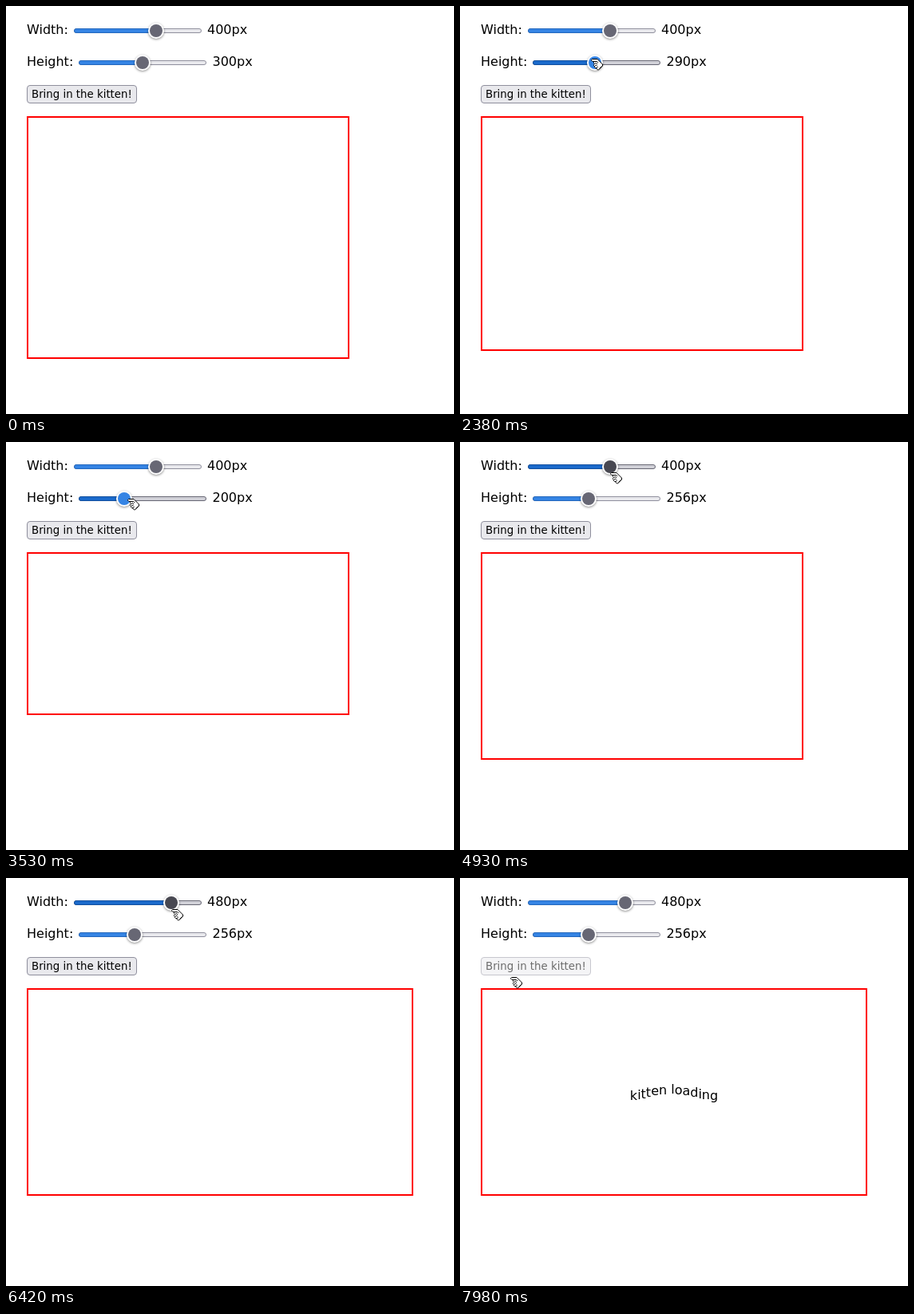
Write an HTML page with a canvas that moves like this. It is 561 px wide and 511 px high and loops after 8000 ms.

```html
<!DOCTYPE html>
<html lang="en">
<head>
<meta charset="utf-8">
<title>Kitten sizer</title>
<style>
html, body { margin: 0; width: 100%; height: 100%; overflow: hidden; background: #fff; }
canvas { display: block; width: 561px; height: 511px; }
</style>
</head>
<body>
<canvas id="stage"></canvas>
<script>
const W = 561, H = 511, LOOP = 8000;
const FONT = '"DejaVu Sans", sans-serif';
const ACCENT = '#3584e4', ACCENT_DARK = '#1b6acb', ACCENT_DARKER = '#12509f';
const PX_PER_UNIT = 140 / 600;
const LAG = 30;

const canvas = document.getElementById('stage');
const ctx = canvas.getContext('2d');
const ratio = window.devicePixelRatio || 1;
canvas.width = Math.round(W * ratio);
canvas.height = Math.round(H * ratio);

// Pointer path: time, x, y
const path = [
  [960, 0, 209], [1360, 142, 94], [1490, 292, 24], [1670, 170, 71],
  [2330, 170, 71], [2560, 125, 31], [2780, 143, 71], [3380, 143, 71],
  [3500, 148, 71], [3530, 152, 71], [3800, 161, 71], [4310, 161, 71],
  [4930, 188, 38], [5730, 188, 38], [6090, 207, 39], [6710, 207, 39],
  [6910, 63, 117], [7560, 63, 117], [7720, 50, 26], [7960, 63, 124]
];

const widthSlider = { x: 85, y: 31, zero: 95, start: 400, down: 5380, up: 6420 };
const heightSlider = { x: 91, y: 71, zero: 101.3, start: 300, down: 2020, up: 3980 };
const button = { x: 26, y: 99, w: 138, h: 23, down: 7380, up: 7440 };

// Slope at a key; flat at holds and turning points
function slope(i, axis) {
  const a = path[i - 1], b = path[i], c = path[i + 1];
  if (!a || !c) return 0;
  if ((b[axis] - a[axis]) * (c[axis] - b[axis]) <= 0) return 0;
  return (c[axis] - a[axis]) / (c[0] - a[0]);
}

function along(t, axis) {
  const last = path.length - 1;
  if (t <= path[0][0]) return path[0][axis];
  if (t >= path[last][0]) return path[last][axis];
  const i = path.findIndex(k => k[0] > t) - 1;
  const a = path[i], b = path[i + 1], d = b[0] - a[0];
  const u = (t - a[0]) / d, u2 = u * u, u3 = u2 * u;
  return Math.round(
    (2 * u3 - 3 * u2 + 1) * a[axis] + (3 * u2 - 2 * u3) * b[axis] +
    d * ((u3 - 2 * u2 + u) * slope(i, axis) + (u3 - u2) * slope(i + 1, axis)));
}

const pressed = (c, t) => t >= c.down && t < c.up;

function valueOf(s, t) {
  if (t < s.down) return s.start;
  const moment = Math.max(s.down, Math.min(t - LAG, s.up));
  return Math.round((along(moment, 1) - s.zero) / PX_PER_UNIT);
}

function overSlider(s, p) {
  return p && p.x >= s.x && p.x <= s.x + 160 && Math.abs(p.y - s.y) <= 9;
}

function overButton(p) {
  return p && p.x >= 26 && p.x < 164 && p.y >= 99 && p.y <= 126;
}

function text(str, x, y, size = 16, color = '#000') {
  ctx.font = `${size}px ${FONT}`;
  ctx.fillStyle = color;
  ctx.fillText(str, x, y);
}

function box(x, y, w, h, r, fill, line) {
  ctx.beginPath();
  ctx.roundRect(x + 0.5, y + 0.5, w - 1, h - 1, r);
  ctx.fillStyle = fill;
  ctx.fill();
  ctx.strokeStyle = line;
  ctx.lineWidth = 1;
  ctx.stroke();
}

function disc(x, y, r, color) {
  ctx.beginPath();
  ctx.arc(x, y, r, 0, Math.PI * 2);
  ctx.fillStyle = color;
  ctx.fill();
}

function drawSlider(s, value, hover, active) {
  const lit = hover || active;
  const thumb = Math.round(s.zero + value * PX_PER_UNIT);
  box(s.x, s.y - 3, 160, 6, 2.5, lit ? '#d0d0d7' : '#e9e9ed', lit ? '#676774' : '#8f8f9d');
  box(s.x, s.y - 3, thumb - s.x, 6, 2.5,
    lit ? ACCENT_DARK : ACCENT, lit ? ACCENT_DARKER : '#2468bd');
  ctx.save();
  ctx.shadowColor = 'rgba(0,0,0,.45)';
  ctx.shadowBlur = 3 * ratio;
  ctx.shadowOffsetY = ratio;
  disc(thumb, s.y, 10, '#fff');
  ctx.restore();
  disc(thumb, s.y, 8, active ? ACCENT : lit ? '#484851' : '#676774');
}

function drawButton(t, hover) {
  const { x, y, w, h } = button;
  let look = ['#e9e9ed', '#8f8f9d', '#000'];
  if (t >= button.up) look = ['#f4f4f6', '#c7c7ce', '#6d6d6d'];
  else if (pressed(button, t)) look = ['#b1b1b9', '#484851', '#000'];
  else if (hover) look = ['#d0d0d7', '#676774', '#000'];
  box(x, y, w, h, 3.5, look[0], look[1]);
  text('Bring in the kitten!', 32, 115, 13.333, look[2]);
}

function drawLoading(t, w, h) {
  const label = 'kitten loading';
  ctx.font = `16px ${FONT}`;
  let x = 28 + w / 2 - ctx.measureText(label).width / 2;
  const base = 140 + h / 2 + 5.7;
  [...label].forEach((ch, i) => {
    const phase = (i - 6.5) / 13 - (t - 7980) / 1000;
    text(ch, x, Math.round(base - 4 * Math.cos(phase * Math.PI * 2)));
    x += ctx.measureText(ch).width;
  });
}

const arrow = new Path2D('M0 0V11.5L2.6 9.2 4.7 14 6.8 13.1 4.8 8.4H8.3Z');
const hand = new Path2D('M.5 1.5L1.5 .5H8L14.5 7V9L9.5 14H8.5L7 12.5V11.5H5.5L4.5 10.5V9.5L3.5 8.5V7.5L4.5 6.5 3.5 5.5V4.5L4.5 3.5H2L.5 2Z');
const fingers = new Path2D('M4.5 3.5H7.5L9 5M4.5 6.5L6.5 5.5 8 7M4.5 9.5L6.5 8 8 9.5M7 11.5L8.5 10.5M10.5 12.5L13.5 9.5');

function drawPointer(p, isHand) {
  ctx.save();
  ctx.translate(p.x, p.y);
  ctx.lineJoin = 'round';
  if (isHand) {
    ctx.fillStyle = '#fff';
    ctx.strokeStyle = '#000';
    ctx.lineWidth = 1;
    ctx.fill(hand);
    ctx.stroke(hand);
    ctx.stroke(fingers);
  } else {
    ctx.strokeStyle = '#fff';
    ctx.lineWidth = 2;
    ctx.stroke(arrow);
    ctx.fillStyle = '#000';
    ctx.fill(arrow);
  }
  ctx.restore();
}

function draw(t) {
  ctx.setTransform(ratio, 0, 0, ratio, 0, 0);
  ctx.fillStyle = '#fff';
  ctx.fillRect(0, 0, W, H);

  const p = t >= path[0][0] ? { x: along(t, 1), y: along(t, 2) } : null;
  const w = valueOf(widthSlider, t), h = valueOf(heightSlider, t);
  const dragW = pressed(widthSlider, t), dragH = pressed(heightSlider, t);
  const hoverW = !dragH && overSlider(widthSlider, p);
  const hoverH = !dragW && overSlider(heightSlider, p);
  const hoverB = !dragW && !dragH && overButton(p);

  text('Width:', 26, 35);
  text(w + 'px', 252, 35);
  text('Height:', 26, 75);
  text(h + 'px', 258.5, 75);
  drawSlider(widthSlider, w, hoverW, dragW);
  drawSlider(heightSlider, h, hoverH, dragH);
  drawButton(t, hoverB);

  ctx.strokeStyle = '#f00';
  ctx.lineWidth = 2;
  ctx.strokeRect(27, 139, w + 2, h + 2);
  if (t >= button.up) drawLoading(t, w, h);
  if (p) drawPointer(p, hoverW || hoverH || hoverB || dragW || dragH);
}

const begin = performance.now();
function tick() {
  draw((performance.now() - begin) % LOOP);
  requestAnimationFrame(tick);
}
tick();
</script>
</body>
</html>
```
